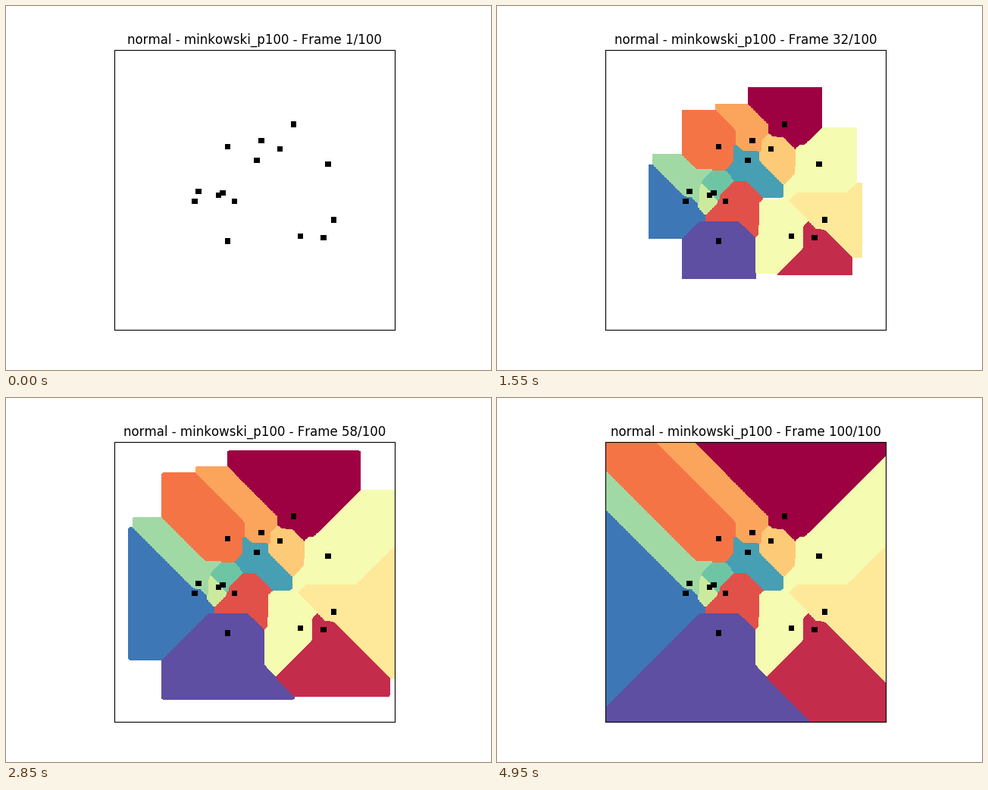
A matplotlib script for the animation above (5000 ms loop, 640x480 px).

```python
import numpy as np
import matplotlib.pyplot as plt
from matplotlib.animation import FuncAnimation

SIZE = 500                # grid cells per side
FRAMES = 100
INTERVAL = 50             # ms
P = 100                   # Minkowski exponent
START, STEP = 5.3, 1.983  # radius in cells: first value and growth per frame
MARK = 5                  # half side of a seed marker, in cells

# Seed positions (column, row), ordered along the colour map
seeds = np.array([
    (320, 134), (373, 336), (214, 271), (202, 174), (262, 163),
    (295, 178), (391, 304), (381, 205), (332, 333), (186, 260),
    (150, 253), (193, 256), (254, 198), (143, 271), (202, 342),
])


def minkowski(dx, dy):
    """Minkowski distance, scaled by the larger axis to stay in range."""
    big = np.maximum(np.maximum(dx, dy), 1e-9)
    ratio = np.minimum(dx, dy) / big
    return big * (1 + ratio ** P) ** (1 / P)


def seed_colors():
    colors = plt.get_cmap("Spectral")(np.linspace(0, 1, len(seeds)))[:, :3]
    colors[7:9] = colors[7:9].mean(axis=0)   # the two pale yellows share a tone
    return colors


rows, cols = np.mgrid[:SIZE, :SIZE].astype(float)
dist = np.stack([minkowski(abs(cols - x), abs(rows - y)) for x, y in seeds])
nearest = dist.min(axis=0)
cells = seed_colors()[dist.argmin(axis=0)]


def grown(i):
    """Cells reached so far on white, with the seeds on top."""
    radius = START + STEP * i if i else -1
    grid = np.where((nearest <= radius)[..., None], cells, 1.0)
    for x, y in seeds:
        grid[y - MARK:y + MARK, x - MARK:x + MARK] = 0
    return grid


plt.rcParams["text.kerning_factor"] = 6
fig, ax = plt.subplots(figsize=(6.4, 4.8), dpi=100)
image = ax.imshow(grown(0), interpolation="nearest")
ax.set_xticks([])
ax.set_yticks([])
title = ax.set_title("", fontsize=12, fontfamily="DejaVu Sans")


def update(i):
    image.set_data(grown(i))
    title.set_text(f"normal - minkowski_p{P} - Frame {i + 1}/{FRAMES}")
    return image, title


anim = FuncAnimation(fig, update, frames=FRAMES, interval=INTERVAL,
                     repeat=True, repeat_delay=0, blit=False)
plt.show()
```
